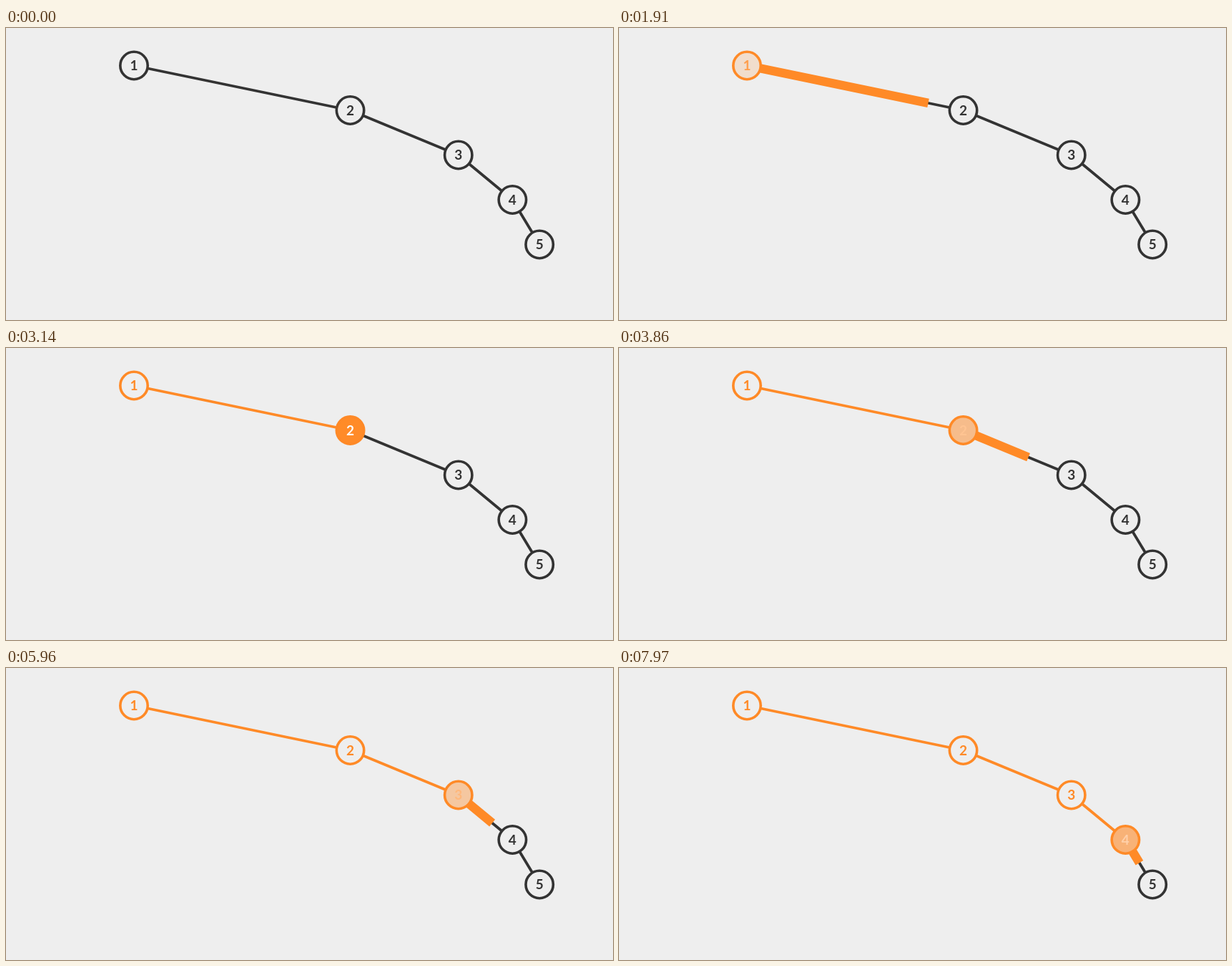
Write an HTML page with a canvas that moves like this. It is 849 px wide and 408 px high and loops after 8000 ms.

```html
<!DOCTYPE html>
<html lang="en">
<head>
<meta charset="utf-8">
<title>Linked nodes</title>
<style>
  html, body { margin: 0; width: 100%; height: 100%; overflow: hidden; background: #eee; }
  canvas { display: block; }
</style>
</head>
<body>
<canvas id="stage" width="849" height="408"></canvas>
<script>
const ctx = document.getElementById('stage').getContext('2d');
const LOOP = 8000;
const DURATION = 810;
const RADIUS = 19.2;
const RIM = 20.8;

const BG = [238, 238, 238];
const DARK = [51, 51, 51];
const ORANGE = [255, 138, 39];
const WHITE = [255, 255, 255];

// Each node starts halfway between the previous one and the right limit.
const nodes = [0, 1, 2, 3, 4].map(i => ({
  x: 784 - 605 / 2 ** i,
  y: 52.5 + 62.5 * i,
  label: String(i + 1)
}));

const fillStarts = [370, 2430, 4530, 6590];
const growStart = i => 1345 + 2070 * i;
const fadeStart = i => growStart(i) + 40;
const settleTime = i => growStart(i) + 890;

const clamp = v => Math.min(1, Math.max(0, v));
const ease = t => t < 0.5 ? 4 * t ** 3 : 1 - 4 * (1 - t) ** 3;
const progress = (time, start) => ease(clamp((time - start) / DURATION));
const mix = (a, b, p) => a.map((v, i) => v + (b[i] - v) * p);
const css = c => `rgb(${c.map(Math.round).join(',')})`;

function line(x1, y1, x2, y2, width, color) {
  ctx.beginPath();
  ctx.moveTo(x1, y1);
  ctx.lineTo(x2, y2);
  ctx.lineWidth = width;
  ctx.strokeStyle = css(color);
  ctx.stroke();
}

function drawEdge(i, time) {
  const a = nodes[i], b = nodes[i + 1];
  const settled = time >= settleTime(i);
  line(a.x, a.y, b.x, b.y, 3.8, settled ? ORANGE : DARK);
  const p = progress(time, growStart(i));
  if (settled || p === 0) return;

  const dx = b.x - a.x, dy = b.y - a.y;
  const length = Math.hypot(dx, dy);
  const reach = (RIM + (length - 2 * RIM) * p) / length;
  line(a.x, a.y, a.x + dx * reach, a.y + dy * reach, 12.4, ORANGE);
}

function drawNode(i, time) {
  const { x, y, label } = nodes[i];
  const lit = i < 4 ? progress(time, fillStarts[i]) : 0;
  const faded = i < 4 ? progress(time, fadeStart(i)) : 0;

  ctx.beginPath();
  ctx.arc(x, y, RADIUS, 0, Math.PI * 2);
  ctx.fillStyle = css(mix(mix(BG, ORANGE, lit), BG, faded));
  ctx.fill();
  ctx.lineWidth = 3.6;
  ctx.strokeStyle = css(mix(DARK, ORANGE, lit));
  ctx.stroke();

  ctx.fillStyle = css(mix(mix(DARK, WHITE, lit), ORANGE, faded));
  ctx.fillText(label, x, y + 6.8);
}

function draw(time) {
  ctx.fillStyle = css(BG);
  ctx.fillRect(0, 0, 849, 408);
  ctx.font = 'bold 19px Lato, "Open Sans", sans-serif';
  ctx.textAlign = 'center';
  ctx.textBaseline = 'alphabetic';
  for (let i = 0; i < 4; i++) drawEdge(i, time);
  for (let i = 0; i < 5; i++) drawNode(i, time);
}

const began = performance.now();
function tick() {
  draw((performance.now() - began) % LOOP);
  requestAnimationFrame(tick);
}
tick();
</script>
</body>
</html>
```
